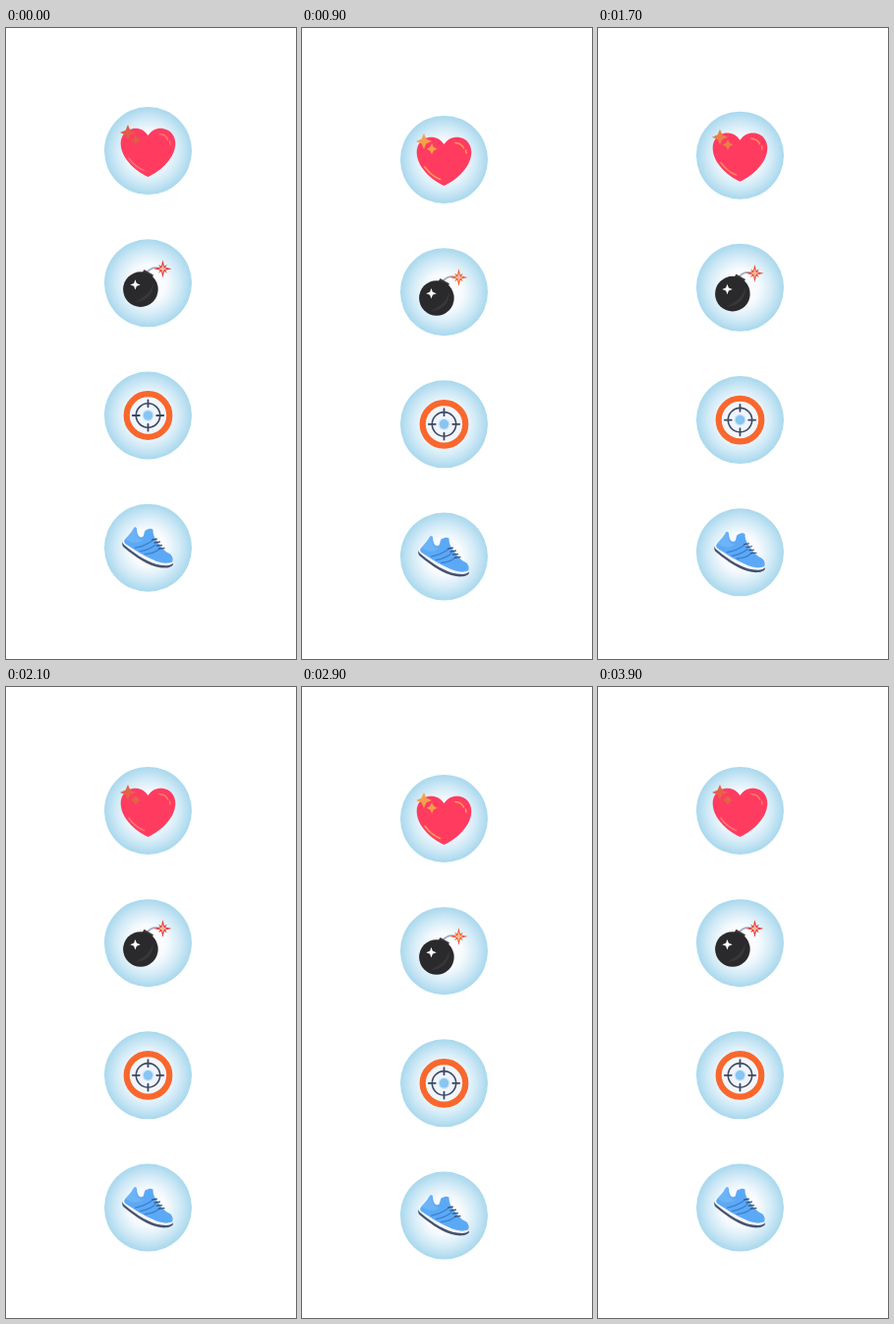
An HTML page with a canvas that plays this animation: 295 px wide and 640 px high, repeating every 4000 ms.

```html
<!DOCTYPE html>
<html lang="en">
<head>
<meta charset="utf-8">
<title>Floating badges</title>
<style>
html, body { margin: 0; width: 100%; height: 100%; overflow: hidden; background: #fff; }
canvas { display: block; width: 295px; height: 640px; }
</style>
</head>
<body>
<canvas id="stage"></canvas>
<script>
const W = 295, H = 640, CX = 144.5, TOP = 124.6, GAP = 134.2, LIFT = 8.9;
const canvas = document.getElementById('stage');
const ctx = canvas.getContext('2d');
const dpr = window.devicePixelRatio || 1;
canvas.width = W * dpr;
canvas.height = H * dpr;

const bezier = (s, a, b) => 3 * (1 - s) ** 2 * s * a + 3 * (1 - s) * s * s * b + s ** 3;

// cubic-bezier(.25, .1, .25, 1)
function ease(x) {
  let lo = 0, hi = 1;
  for (let i = 0; i < 24; i++) {
    const mid = (lo + hi) / 2;
    if (bezier(mid, .25, .25) < x) lo = mid; else hi = mid;
  }
  return bezier(lo, .1, 1);
}

function mix(a, b, k) {
  return `rgb(${a.map((v, i) => Math.round(v + (b[i] - v) * k))})`;
}

function fill(path, color) {
  ctx.fillStyle = color;
  ctx.fill(new Path2D(path));
}

function stroke(path, color, width) {
  ctx.strokeStyle = color;
  ctx.lineWidth = width;
  ctx.stroke(new Path2D(path));
}

function disc(x, y, r, color) {
  ctx.beginPath();
  ctx.arc(x, y, r, 0, 7);
  ctx.fillStyle = color;
  ctx.fill();
}

function ring(r, width, color) {
  ctx.beginPath();
  ctx.arc(0, 0, r, 0, 7);
  ctx.strokeStyle = color;
  ctx.lineWidth = width;
  ctx.stroke();
}

function star(x, y, outer, inner, color, turn = 0) {
  ctx.beginPath();
  for (let i = 0; i < 8; i++) {
    const r = i % 2 ? inner : outer, a = i * Math.PI / 4 + turn;
    ctx.lineTo(x + r * Math.cos(a), y + r * Math.sin(a));
  }
  ctx.closePath();
  ctx.fillStyle = color;
  ctx.fill();
}

function badge() {
  const g = ctx.createRadialGradient(0, 0, 0, 0, 0, 44.5);
  g.addColorStop(0, '#ffffff');
  g.addColorStop(.42, '#f8fbfe');
  g.addColorStop(.72, '#d3ebf7');
  g.addColorStop(1, '#a9d8ed');
  disc(0, 0, 44.5, g);
}

function heart(k) {
  fill('M0-15.5C5-23 12-23 15-22.6C23-21.5 28-15 27.8-7C27.4 7 14 20 0 26.5C-14 20-27.4 7-27.8-7C-28-15-23-21.5-15-22.6C-12-23-5-23 0-15.5Z', '#ff3c60');
  const glow = mix([250, 116, 116], [255, 152, 86], k);
  stroke('M-19.5 7.5Q-13 16.5-4 20M11.5-17Q18-16.5 20-11.5M22-9.5L22.5-6.5', glow, 1.5);
  const spark = mix([226, 92, 72], [246, 158, 76], k);
  star(-20.5, -18.5, 8, 3.4, spark);
  star(-12.4, -10.8, 5.4, 2.6, spark);
}

function bomb(k) {
  stroke('M-2-10C2-15 7-17 13-14.5', '#a5a9bd', 1.7);
  ctx.save();
  ctx.translate(-1, -8);
  ctx.rotate(.52);
  ctx.fillStyle = '#3b3b3e';
  ctx.fillRect(-5.5, -3.5, 11, 8);
  ctx.restore();
  disc(-7.6, 6.3, 17.8, '#2a2a2c');
  fill('M5 0C7 10-2 20-14 19C-4 15 3 9 5 0Z', '#373739');
  star(-13, 1.6, 5.2, 2, '#fff');
  const spark = mix([222, 52, 58], [236, 96, 46], k);
  star(15, -14.6, 6, 1.8, spark, Math.PI / 4);
  star(15, -14.6, 9, 2.4, spark);
  star(15, -14.6, 4.5, 1.8, '#f8b69a');
}

function target() {
  disc(0, 0, 22, '#f1f6fc');
  ring(21.8, 6.2, '#f9672d');
  ring(12.2, 1.6, '#3d4766');
  stroke('M-15.7 0H-8.7M8.7 0H15.7M0-15.7V-8.7M0 8.7V15.7', '#3d4766', 1.8);
  disc(0, 0, 6.2, '#d3eafa');
  disc(0, 0, 4.8, '#89c5f1');
}

function shoe() {
  fill('M-24-8C-27-6-27-2-24 0C-12 10 0 18 12 20C18 21 24 20 25.5 17L24 13Z', '#46536e');
  fill('M-24-10C-27-7-26-4-23-2C-11 8 2 16 13 17.5C19 18.5 24 18 25.5 15L23 11Z', '#f4f7fc');
  fill('M-23-9C-19-13-16-17-14.5-20C-14-21.5-11.5-21-11.5-19C-11-13-9-10-6-11C-3-12-5-17-2-18C1-19.5 3-20 5-18.5C5-14 6-11 9-7C13-1 17 4 22 6C25 8 26 12 24.5 14.5C18 17 11 15 5 12C-5 8-15 1-23-4C-25-6-24.5-8-23-9Z', '#5ba9f6');
  fill('M-23-9C-19-13-16-17-14.5-20L-12.5-20C-12-12-10-8-5-8C-10-4-17-4-23-9Z', '#6cb3f7');
  stroke('M-13 0Q-5-1 4-7M-8 3.5Q1 2 7.5-3M-3 6.5Q6 6 11.5 1', '#3c7fce', 1.3);
  stroke('M4-8L9-9M6.5-5L12-6M9-2L14-2.5M11 1L16.5 .5', '#3a4a70', 1.2);
}

const icons = [heart, bomb, target, shoe];

function draw(now) {
  const t = Math.floor(now % 4000 / 100) * 100 % 2000 / 1000;
  const k = ease(t <= 1 ? t : 2 - t);
  ctx.setTransform(dpr, 0, 0, dpr, 0, 0);
  ctx.fillStyle = '#fff';
  ctx.fillRect(0, 0, W, H);
  ctx.lineCap = 'round';
  icons.forEach((icon, i) => {
    ctx.save();
    ctx.translate(CX, TOP + i * GAP + LIFT * k);
    badge();
    icon(k);
    ctx.restore();
  });
}

const start = performance.now();
function tick() {
  draw(performance.now() - start);
  requestAnimationFrame(tick);
}
tick();
</script>
</body>
</html>
```
